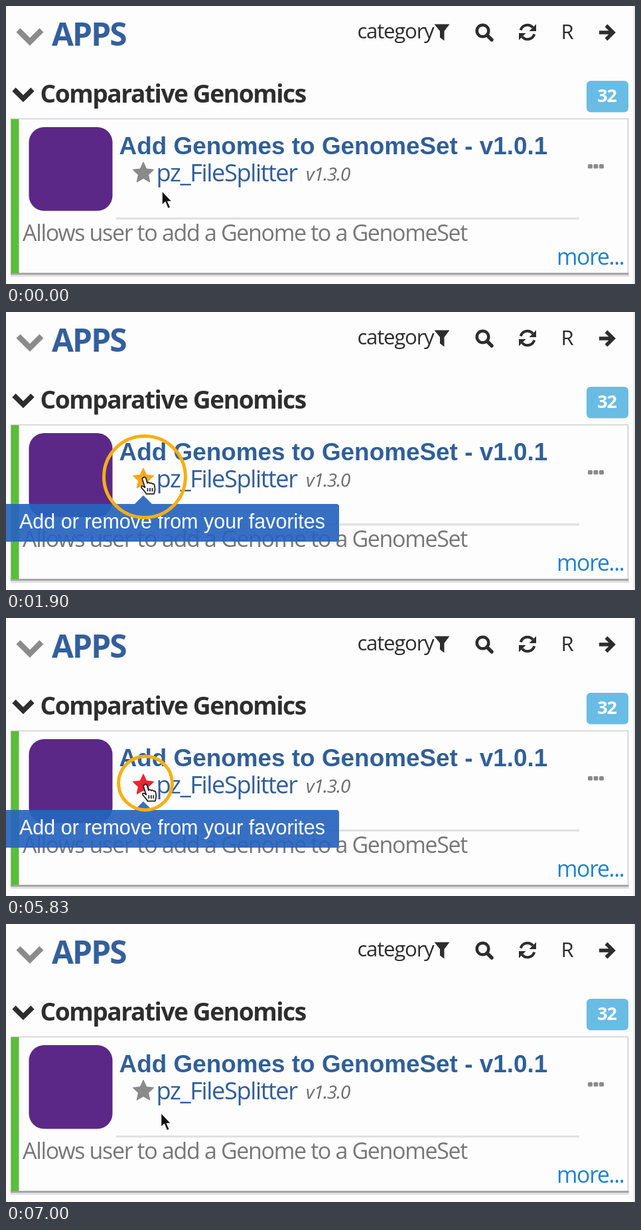
An HTML page for the animation above (7230 ms loop, 948 by 420 pixels).

```html
<!DOCTYPE html>
<html lang="en">
<head>
<meta charset="utf-8">
<title>Favorite an app</title>
<style>
  html, body { margin: 0; width: 100%; height: 100%; overflow: hidden; background: #fdfdfd; }
  svg { display: block; }
  text { font-family: "Open Sans", "Noto Sans", sans-serif; letter-spacing: -.04em; }
  .arial { font-family: "Liberation Sans", Arial, sans-serif; letter-spacing: 0; }
  .bold { font-weight: 700; }
  .line { fill: none; stroke: #2d2d2d; }
</style>
</head>
<body>
<svg width="948" height="420" viewBox="0 0 948 420">
  <path d="M946.5 0V420" stroke="#dcdcdc" stroke-width="1.5"/>

  <!-- Panel header -->
  <path class="line" d="M18.500 36.500L36 54L53.500 36.500" style="stroke:#8b8b8b" stroke-width="8.500"/>
  <text class="bold" x="69" y="60" font-size="47.800" fill="#345f9c">APPS</text>
  <g fill="#2d2d2d">
    <text x="529.500" y="49" font-size="31.200">category</text>
    <path d="M645.500 27.500H668.500L660.500 38V52.500L654 47.500V38Z"/>
    <circle class="line" cx="718.500" cy="37.500" r="8.800" stroke-width="4.500"/>
    <path class="line" d="M725 44L732 51" stroke-width="5.500" stroke-linecap="round"/>
    <g id="refreshHalf">
      <path class="line" d="M775.800 36.500A10.500 10.500 0 0 1 794 32.500" stroke-width="4"/>
      <path d="M799 27.500V38H788.500Z"/>
    </g>
    <use href="#refreshHalf" transform="rotate(180 786 39.500)"/>
    <text x="836.500" y="50" font-size="31">R</text>
    <path class="line" d="M894 40H914M904.500 29.500L915 40L904.500 50.500" stroke-width="5.500"/>
  </g>

  <!-- Category row -->
  <path class="line" d="M12 126L26 140L40 126" stroke-width="7.500"/>
  <text class="bold" x="51.500" y="146" font-size="37.200" fill="#2e2e2e">Comparative Genomics</text>
  <rect x="875" y="113" width="63" height="47.500" rx="6" fill="#69bce3"/>
  <text class="bold" x="905.500" y="145" font-size="27" fill="#fff" text-anchor="middle">32</text>

  <!-- App card -->
  <path d="M7 407H939" stroke="#dedede" stroke-width="4"/>
  <rect x="7.500" y="170.500" width="930" height="234" fill="#fdfdfd" stroke="#cfcfcf" stroke-width="1.500"/>
  <path d="M7 404.500H938.500" stroke="#a6a6a6" stroke-width="3"/>
  <rect x="7.500" y="171" width="12" height="232.500" fill="#5cbc3b"/>
  <rect x="34.500" y="183" width="126" height="126.500" rx="23" fill="#5b2887"/>
  <text class="arial bold" x="170.500" y="223.500" font-size="36.900" fill="#305f98">Add Genomes to GenomeSet - v1.0.1</text>
  <text x="226.500" y="265" font-size="36.300" fill="#2f5d9b">pz_FileSplitter</text>
  <text x="452" y="264" font-size="27.800" font-style="italic" fill="#6c6c6c">v1.3.0</text>
  <g fill="#8a8a8a">
    <rect x="877" y="239" width="7" height="6.500" rx="1.500"/>
    <rect x="885.500" y="239" width="7" height="6.500" rx="1.500"/>
    <rect x="894" y="239" width="7" height="6.500" rx="1.500"/>
  </g>
  <path d="M166 321H864" stroke="#dfdfdf" stroke-width="3"/>
  <text x="25" y="354.500" font-size="34" fill="#777">Allows user to add a Genome to a GenomeSet</text>
  <text x="830" y="391" font-size="33.800" fill="#1f82d2">more...</text>

  <path id="star" stroke-width="1" stroke-linejoin="round"/>
  <g id="tooltip">
    <path d="M0 290H194L207 277L220 290H498Q502 290 502 294V343Q502 347 498 347H0Z" fill="#2664be" opacity=".92"/>
    <text class="arial" x="20" y="327" font-size="30.500" fill="#fff">Add or remove from your favorites</text>
  </g>
  <circle id="ring" fill="none" stroke="#f9ae13" stroke-width="5"/>

  <path id="arrow" d="M0 0V22L5 17.500L9 27L13 25.500L9 16.500H15.500Z" fill="#111" stroke="#fff" stroke-width="1.500"/>
  <g id="hand" stroke="#222" stroke-width="1.800" stroke-linejoin="round">
    <path fill="#fff" d="M4 2c2-2 4-1 4.500 1l2 7c1-1.500 3.500-1 4 .5 1-1 3-.8 3.500 .8 1.500-.8 3 .2 3.300 2l.7 5c.3 3-.8 4-1.500 8H9c-1-3-5-6-7-9-1.500-2.500 1-4 3-2l2 1.500L3 4.500C2.700 3 3 2.500 4 2z"/>
    <path d="M11 17.500v5M14.500 17.500v5M18 17.500v5"/>
  </g>
</svg>
<script>
const LOOP = 7230;
const ENTER = 530, LEAVE = 6790;
const RING_LIFE = 1270;
const CLICKS = [{ at: 1160, x: 209, y: 249 }, { at: 5460, x: 210, y: 249.5 }];
const FAVORITE_ON = 1500, FAVORITE_OFF = 5800;

const [star, tooltip, ring, arrow, hand] =
  ["star", "tooltip", "ring", "arrow", "hand"].map(id => document.getElementById(id));

const progress = (t, from, to) => Math.min(1, Math.max(0, (t - from) / (to - from)));
const mix = (a, b, p) => a + (b - a) * p;
const smooth = p => p * p * (3 - 2 * p);
const show = (node, visible) => node.setAttribute("visibility", visible ? "visible" : "hidden");
const move = (node, x, y) => node.setAttribute("transform", `translate(${x} ${y})`);

function starPath(cx, cy, outer, inner) {
  const points = Array.from({ length: 10 }, (_, i) => {
    const r = i % 2 ? inner : outer, angle = i * Math.PI / 5 - Math.PI / 2;
    return `${cx + r * Math.cos(angle)} ${cy + r * Math.sin(angle)}`;
  });
  return `M${points.join("L")}Z`;
}
star.setAttribute("d", starPath(207, 252.5, 16.7, 8));

function drawStar(t, hovering) {
  const favorite = t >= FAVORITE_ON && t < FAVORITE_OFF;
  const color = !hovering ? "#8a8a8a" : favorite ? "#f9a817" : "#ee2330";
  star.setAttribute("fill", color);
  star.setAttribute("stroke", color);
}

function drawRing(t) {
  const click = CLICKS.find(c => t >= c.at && t < c.at + RING_LIFE);
  show(ring, click);
  if (!click) return;
  const left = 1 - (t - click.at) / RING_LIFE;
  ring.setAttribute("cx", click.x);
  ring.setAttribute("cy", click.y);
  ring.setAttribute("r", 80.5 - 65 * left ** 1.4);
}

function drawCursor(t, hovering) {
  show(arrow, !hovering);
  show(hand, hovering);
  if (t < ENTER) {
    const p = smooth(progress(t, 400, 600));
    move(arrow, mix(235, 208, p), mix(279, 250, p));
  } else {
    const p = smooth(progress(t, 6700, 6910)), settle = progress(t, 6930, 7000);
    move(arrow, mix(209, 233.5, p), mix(252, 287, p) - 2 * settle);
  }
  const nudge = t < 860 ? 1.5 : t < 900 ? 1 : t < 4830 ? 0 : 1.8;
  move(hand, 202.5 + nudge, 248.5 + nudge);
}

function draw(t) {
  const hovering = t >= ENTER && t < LEAVE;
  drawStar(t, hovering);
  drawRing(t);
  drawCursor(t, hovering);
  tooltip.setAttribute("opacity", progress(t, 1240, 1400) - progress(t, LEAVE, 6900));
}

function tick() {
  draw(performance.now() % LOOP);
  requestAnimationFrame(tick);
}
tick();
</script>
</body>
</html>
```
